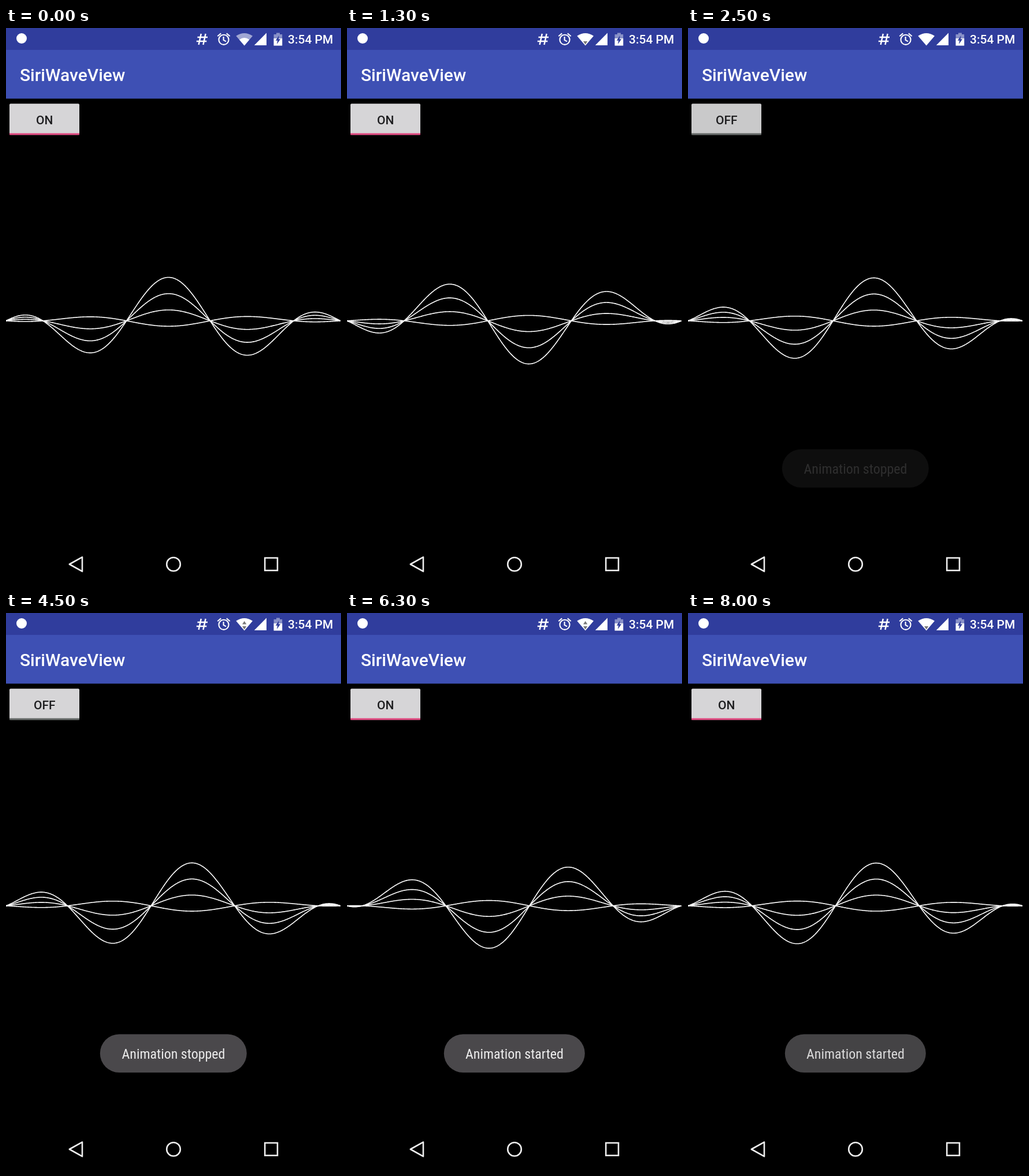
Recreate the animation shown at these times as an HTML page with a canvas. Size 580 by 966 pixels, loop 8.1 s.

```html
<!DOCTYPE html>
<html lang="en">
<head>
<meta charset="utf-8">
<title>SiriWaveView</title>
<style>
  html, body { margin: 0; width: 100%; height: 100%; overflow: hidden; background: #000; }
  canvas, svg { position: absolute; left: 0; top: 0; width: 580px; height: 966px; display: block; }
  text { font-family: Roboto, sans-serif; font-weight: 500; }
  #label { font-family: "Roboto Condensed", Roboto, sans-serif; font-stretch: condensed; font-weight: 400; font-size: 24px; }
</style>
</head>
<body>
<canvas id="wave" width="580" height="966"></canvas>
<svg viewBox="0 0 580 966">
  <rect width="580" height="38.5" fill="#303d9d"/>
  <rect y="38" width="580" height="84.5" fill="#3e50b4"/>

  <!-- status icons -->
  <circle cx="27" cy="18" r="9" fill="#fff"/>
  <path d="M337.8 10 L333.6 29 M345.6 10 L341.4 29 M331.5 16 H349 M329.8 23 H347.3" fill="none" stroke="#fff" stroke-width="2.5"/>
  <g fill="none" stroke="#fff" stroke-width="2.1">
    <circle cx="377" cy="20.3" r="8.6"/>
    <path d="M366.3 14.2 L372.2 9.4 M387.7 14.2 L381.8 9.4 M376.6 15 V20.8 L381 23.4"/>
  </g>
  <path id="fan" d="M398.3 13.8 Q412.6 4.4 427 13.8 L412.7 30.5 Z" fill="#fff"/>
  <path id="inner" d="M404 20.3 Q412.7 13.5 421.3 20.3 L412.7 30.5 Z" fill="#fff"/>
  <path id="up" d="M412.7 14 L416.3 19.5 H409 Z" fill="#777"/>
  <path id="down" d="M409 23 H416.3 L412.7 28.5 Z" fill="#777"/>
  <path d="M451 8.5 V30 H429.8 Z" fill="#fff"/>
  <path d="M463.6 11 H468 V8.4 H474 V11 H478.2 V30.5 H463.6 Z" fill="#8991c8"/>
  <rect x="463.6" y="18" width="14.6" height="12.5" fill="#fff"/>
  <path d="M472.6 13 L466.8 21.8 H470 L469 28 L475.2 19.2 H472 Z" fill="#303d9d"/>
  <text x="488" y="27" font-size="21" fill="#fff">3:54 PM</text>
  <text x="24" y="92" font-size="30" fill="#fff">SiriWaveView</text>

  <!-- toggle -->
  <rect x="6" y="131.3" width="121" height="54" rx="2" fill="#d6d5d7"/>
  <rect id="shade" x="6" y="131.3" width="121" height="54" rx="2" fill="#000"/>
  <rect id="bar" x="6" y="182.5" width="121" height="3"/>
  <text id="state" x="66.7" y="167" font-size="21" text-anchor="middle" fill="#1d1d1f"></text>

  <!-- toast -->
  <g id="toast">
    <rect id="pill" y="730.5" height="66.5" rx="33.2" fill="#4d4b4e"/>
    <text id="label" x="290" y="773" text-anchor="middle" fill="#f4f4f4"></text>
  </g>

  <!-- navigation -->
  <g fill="none" stroke="#eee" stroke-width="2.6" stroke-linejoin="round">
    <path d="M109.8 930 L132 917.6 V942.4 Z"/>
    <circle cx="290" cy="930" r="11.8"/>
    <rect x="448.2" y="919" width="21.8" height="21.8" stroke-linejoin="miter"/>
  </g>
</svg>
<script>
const LOOP = 8100, STEP = 100;
const STOP = 2400, START = 5830;
const WIDTH = 579, MID = WIDTH / 2, BASE = 507.8, AMP = 75.4;
const WAVES = [1, 0.625, 0.25, -0.125];
const TOASTS = [
  { at: 2450, text: 'Animation stopped', width: 254 },
  { at: 5880, text: 'Animation started', width: 244 }
];
// time and horizontal position of a crest
const CREST = [[0, 281], [STOP, 613], [START, 613], [7100, 788], [LOOP, 920]];
const WIFI = [[0, 'low'], [500, 'full'], [1200, 'down'], [2000, 'full'], [3500, 'both'], [6700, 'full'], [7200, 'down']];

const $ = id => document.getElementById(id);
const ctx = $('wave').getContext('2d');
const clamp = v => Math.min(1, Math.max(0, v));
const ramp = (t, from, to) => clamp((t - from) / (to - from));
const setText = (el, s) => { if (el.textContent !== s) el.textContent = s; };

function crestAt(t) {
  const i = CREST.findIndex(k => t < k[0]);
  const [t0, x0] = CREST[i - 1], [t1, x1] = CREST[i];
  return x0 + (x1 - x0) * ramp(t, t0, t1);
}

function drawWaves(t) {
  const crest = crestAt(t);
  ctx.clearRect(0, 0, 580, 966);
  ctx.strokeStyle = '#fff';
  ctx.lineWidth = 1.6;
  ctx.lineJoin = 'round';
  for (const w of WAVES) {
    ctx.beginPath();
    for (let x = 0; x <= WIDTH; x++) {
      const envelope = 1 - ((x - MID) / MID) ** 2;
      ctx.lineTo(x, BASE - AMP * w * envelope * Math.cos(2 * Math.PI * (x - crest) / MID));
    }
    ctx.stroke();
  }
}

function drawWifi(t) {
  const mode = WIFI.filter(s => s[0] <= t).pop()[1];
  $('fan').setAttribute('opacity', mode === 'low' ? 0.55 : 1);
  $('inner').setAttribute('opacity', mode === 'low' ? 1 : 0);
  $('up').setAttribute('opacity', mode === 'both' ? 1 : 0);
  $('down').setAttribute('opacity', mode === 'both' || mode === 'down' ? 1 : 0);
}

const press = (t, at) => ramp(t, at - 200, at) * (1 - ramp(t, at, at + 400));

function drawToggle(t) {
  const off = t >= STOP && t < START;
  setText($('state'), off ? 'OFF' : 'ON');
  $('bar').setAttribute('fill', off ? '#646867' : '#e2477f');
  $('shade').setAttribute('opacity', 0.08 * Math.max(press(t, STOP), press(t, START)));
}

function drawToast(t) {
  const toast = TOASTS[t < START ? 0 : 1], age = t - toast.at;
  const fadeIn = 1 - (1 - ramp(age, 0, 500)) ** 2;
  const fadeOut = 1 - ramp(age, 1960, 2450) ** 2;
  $('toast').setAttribute('opacity', fadeIn * fadeOut);
  $('pill').setAttribute('x', 289.8 - toast.width / 2);
  $('pill').setAttribute('width', toast.width);
  setText($('label'), toast.text);
}

// use a smaller size where no condensed face is available
setText($('label'), TOASTS[0].text);
if ($('label').getComputedTextLength() > 188) $('label').style.fontSize = '21px';

const origin = performance.now();
function frame() {
  const t = Math.floor((performance.now() - origin) % LOOP / STEP) * STEP;
  drawWaves(t);
  drawWifi(t);
  drawToggle(t);
  drawToast(t);
  requestAnimationFrame(frame);
}
frame();
</script>
</body>
</html>
```
